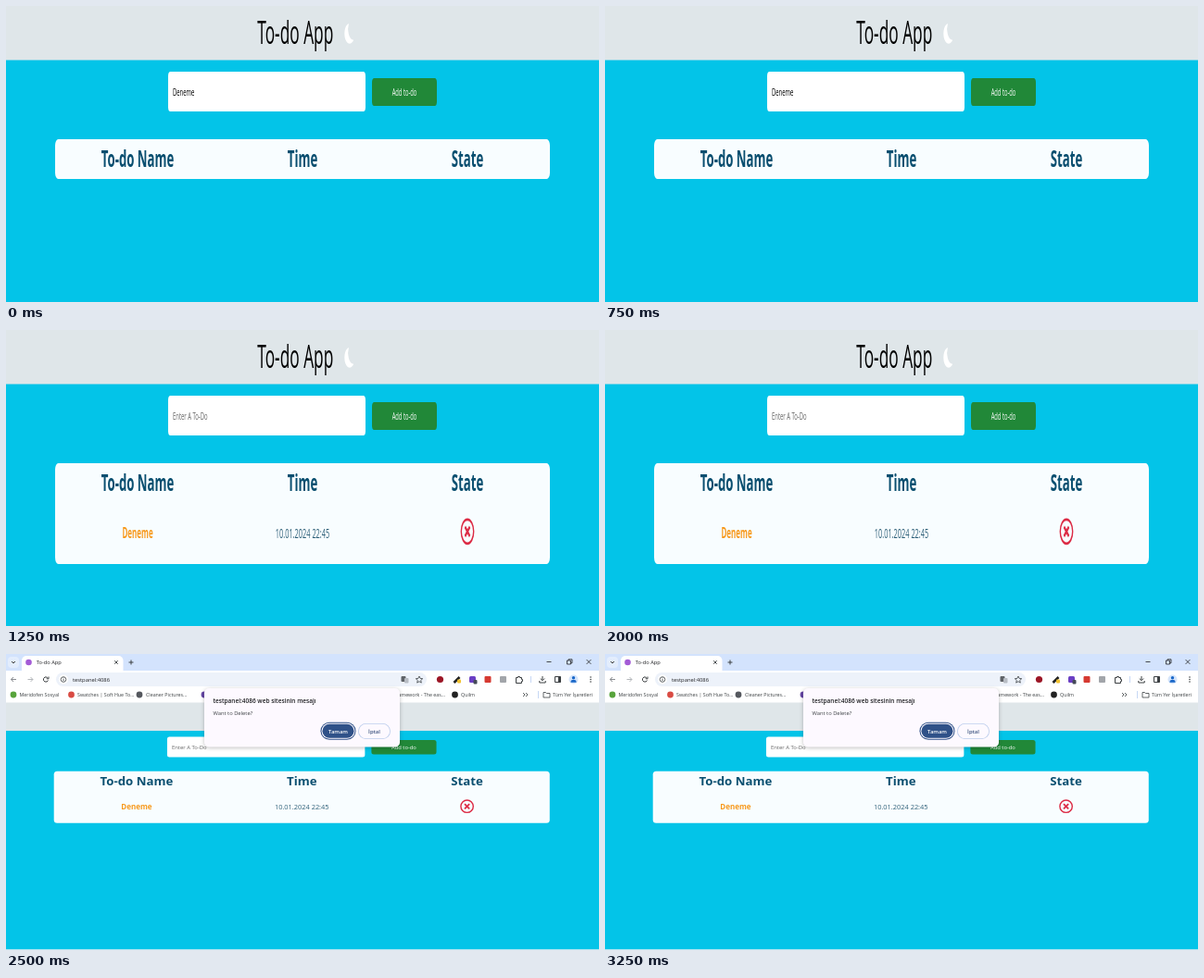
An HTML page with a canvas for the animation above (3750 ms loop, 640 px wide and 320 px high).

```html
<!DOCTYPE html>
<html lang="en">
<head>
<meta charset="utf-8">
<title>To-do App</title>
<style>
  html, body { margin: 0; width: 100%; height: 100%; overflow: hidden; }
  canvas { display: block; }
</style>
</head>
<body>
<canvas id="stage" width="640" height="320"></canvas>
<script>
const ctx = document.getElementById('stage').getContext('2d');
const SCREEN_MS = 1250;
const SANS = '"Open Sans", "Noto Sans", sans-serif';
const HOST = 'testpanel:4086';
const CYAN = '#03c4e8', NAVY = '#0a4f70', RED = '#dc2b45', INK = '#3c4043';

function text(str, x, y, size, color, weight = 400, align = 'left') {
  ctx.font = `${weight} ${size}px ${SANS}`;
  ctx.textAlign = align;
  ctx.fillStyle = color;
  ctx.fillText(str, x, y);
}

function box(x, y, w, h, color, radius = 0) {
  ctx.beginPath();
  ctx.roundRect(x, y, w, h, radius);
  ctx.fillStyle = color;
  ctx.fill();
}

function disc(x, y, r, color) {
  ctx.beginPath();
  ctx.arc(x, y, r, 0, 2 * Math.PI);
  ctx.fillStyle = color;
  ctx.fill();
}

function ring(x, y, r, color, width = 1, from = 0, to = 2 * Math.PI) {
  ctx.beginPath();
  ctx.arc(x, y, r, from, to);
  ctx.strokeStyle = color;
  ctx.lineWidth = width;
  ctx.stroke();
}

function path(d, color = INK, width = 1) {
  ctx.strokeStyle = color;
  ctx.lineWidth = width;
  ctx.stroke(new Path2D(d));
}

function cross(x, y, r, color, width) {
  path(`M${x - r} ${y - r}l${2 * r} ${2 * r}M${x + r} ${y - r}l${-2 * r} ${2 * r}`, color, width);
}

function drawPage(entry, hasRow) {
  box(-5, -5, 660, 350, CYAN);
  box(-5, -5, 660, 88.6, '#dfe6e9');
  text('To-do App', 312.3, 74.7, 17.3, '#000', 500, 'center');
  ctx.fillStyle = '#fff';
  ctx.fill(new Path2D('M370 63.3A5.6 5.6 0 1 0 375.2 72.4A6 6 0 0 1 370 63.3Z'));

  box(175, 90, 213, 22.1, '#fff', 2.5);
  text(entry || 'Enter A To-Do', 180, 103.2, 5.9, entry ? '#000' : '#666');
  box(395, 93.6, 70, 15.4, '#218838', 2.5);
  text('Add to-do', 430, 103.2, 5.8, '#fff', 500, 'center');

  box(53, 127.4, 534, hasRow ? 55.9 : 22.1, '#f8fdff', 3.5);
  text('To-do Name', 142, 142.8, 13.2, NAVY, 700, 'center');
  text('Time', 320, 142.8, 13.2, NAVY, 700, 'center');
  text('State', 498, 142.8, 13.2, NAVY, 700, 'center');
  if (!hasRow) return;
  text('Deneme', 142, 169, 8, '#f7991c', 700, 'center');
  text('10.01.2024 22:45', 320, 169, 7.4, '#2f6078', 400, 'center');
  ring(498, 165.3, 6.7, RED, 1.4);
  cross(498, 165.3, 2.6, RED, 1.8);
}

function drawTabs() {
  box(0, 0, 640, 18, '#d3e3fd');
  box(2, 3, 12, 12, '#e3edfd', 4);
  path('M6 8l2 2l2 -2');
  box(17, 2, 109.5, 17, '#fff', [5, 5, 0, 0]);
  disc(24.5, 9, 3.3, '#a35bd6');
  text('To-do App', 32.8, 11.2, 5.7, '#202124');
  cross(119, 9, 1.8, INK, 0.9);
  path('M132.5 9h5M135 6.5v5');
  path('M583.5 8.5h5M605.5 7h4v4h-4zM607 7v-1.2h4v4h-1.5', '#222', 0.8);
  cross(629, 8.5, 2.4, '#222', 0.8);
}

function drawToolbar() {
  box(0, 18, 640, 34.5, '#fff');
  path('M11 27.5h-5.5M8 25l-2.5 2.5l2.5 2.5', '#8b8e93');
  path('M23.5 27.5h5.5M26.5 25l2.5 2.5l-2.5 2.5', '#b4b7bb');
  ring(43, 27.5, 2.6, INK, 1, 0.4, 5.6);
  path('M46 24.5v2.3h-2.3');
  box(54, 20, 400, 15, '#edf2fa', 7.5);
  disc(62, 27.5, 5, '#fff');
  ring(62, 27.5, 2.8, INK, 0.8);
  path('M62 27v2M62 25.5v0.8', INK, 0.8);
  text(HOST, 72, 29.7, 5.8, '#202124');

  box(426.5, 24, 5, 6, '#5f6368', 1);
  box(430, 26, 4.5, 5.5, '#b8bdc4', 1);
  path('M446 24l1.1 2.4l2.6 .3l-2 1.8l.6 2.6l-2.3 -1.4l-2.3 1.4l.6 -2.6l-2 -1.8l2.6 -.3z', INK, 0.8);

  disc(468.5, 27.5, 3.6, '#9c1626');
  path('M483.5 31l6 -6', '#222', 2.6);
  box(487, 27.5, 4, 4, '#f2c230', 1);
  box(500, 24, 7, 7, '#6b3fc4', 1.5);
  box(504.5, 28, 4, 4.5, '#454a58', 1);
  box(516.5, 24, 7, 7, '#d63a32', 1);
  box(533, 24, 7, 7, '#a2a5aa', 1);
  path('M550.5 25.5h2v-1h2v1h2v2h1v2h-1v2h-6z');
  box(566, 24, 1, 7, '#c7d8f5');
  path('M579 24v4.5M576.8 26.5l2.2 2.2l2.2 -2.2M575.8 29v2h6.4v-2');
  path('M592.5 24.5h6v6h-6z');
  box(596, 24.5, 2.5, 6, INK);
  disc(612.5, 27.5, 5, '#d5e5fb');
  disc(612.5, 25.8, 1.7, '#1967c8');
  box(609.5, 28, 6, 2.8, '#1967c8', [2, 2, 0, 0]);
  for (const y of [25, 27.5, 30]) disc(631, y, 0.8, INK);
}

function drawBookmarks() {
  const links = [
    [8, '#58a43c', 'Meridofen Sosyal', 14.5],
    [70.5, '#d94b43', 'Swatches | Soft Hue To...', 77],
    [144, '#55585e', 'Cleaner Pictures...', 151],
    [214, '#6546a5', '', 222],
    [484.5, '#222', 'Quilm', 491]
  ];
  for (const [iconX, color, label, x] of links) {
    disc(iconX, 44, 3.4, color);
    text(label, x, 46, 5.3, INK);
  }
  text('amework - The eas...', 474, 46, 5.3, INK, 400, 'right');
  path('M558 42l2 2l-2 2M561 42l2 2l-2 2', INK, 0.8);
  box(574, 40, 1, 8, '#c7d8f5');
  path('M580 41.5h2.5l1 1h3.5v4.5h-7z', INK, 0.8);
  text('Tüm Yer İşaretleri', 590, 46, 5.3, INK);
}

function drawDialog() {
  const fill = '#fdf9ff', blue = '#2f5188';
  ctx.save();
  ctx.shadowColor = 'rgba(0, 0, 0, .25)';
  ctx.shadowBlur = 4;
  ctx.shadowOffsetY = 1;
  box(214, 37, 211, 63.5, fill, 5);
  ctx.restore();
  text(HOST + ' web sitesinin mesajı', 223.5, 53, 6.5, '#202124', 600);
  text('Want to Delete?', 223.5, 66, 5.8, INK);
  box(339.5, 73.7, 38, 19, blue, 9.5);
  box(340.5, 74.7, 36, 17, fill, 8.5);
  box(341.5, 75.7, 34, 15, blue, 7.5);
  text('Tamam', 358.5, 85.5, 5.9, '#fff', 600, 'center');
  box(380, 75, 35, 17, '#bccdec', 8.5);
  box(380.8, 75.8, 33.4, 15.4, fill, 7.7);
  text('İptal', 397.5, 85.5, 5.9, '#39517d', 600, 'center');
}

function drawTallPage(entry, hasRow) {
  ctx.setTransform(1, 0, 0, 1.95, 0, -104.5);
  drawPage(entry, hasRow);
}

function drawBrowser() {
  ctx.setTransform(1.002, 0, 0, 1, -1.4, -0.6);
  drawPage('', true);
  ctx.resetTransform();
  drawTabs();
  drawToolbar();
  drawBookmarks();
  drawDialog();
  box(0, 319, 640, 1, '#a5e4f2');
}

const screens = [
  () => drawTallPage('Deneme', false),
  () => drawTallPage('', true),
  drawBrowser
];

const start = performance.now();
function tick() {
  const elapsed = performance.now() - start;
  screens[Math.floor(elapsed / SCREEN_MS) % screens.length]();
  requestAnimationFrame(tick);
}
tick();
</script>
</body>
</html>
```
